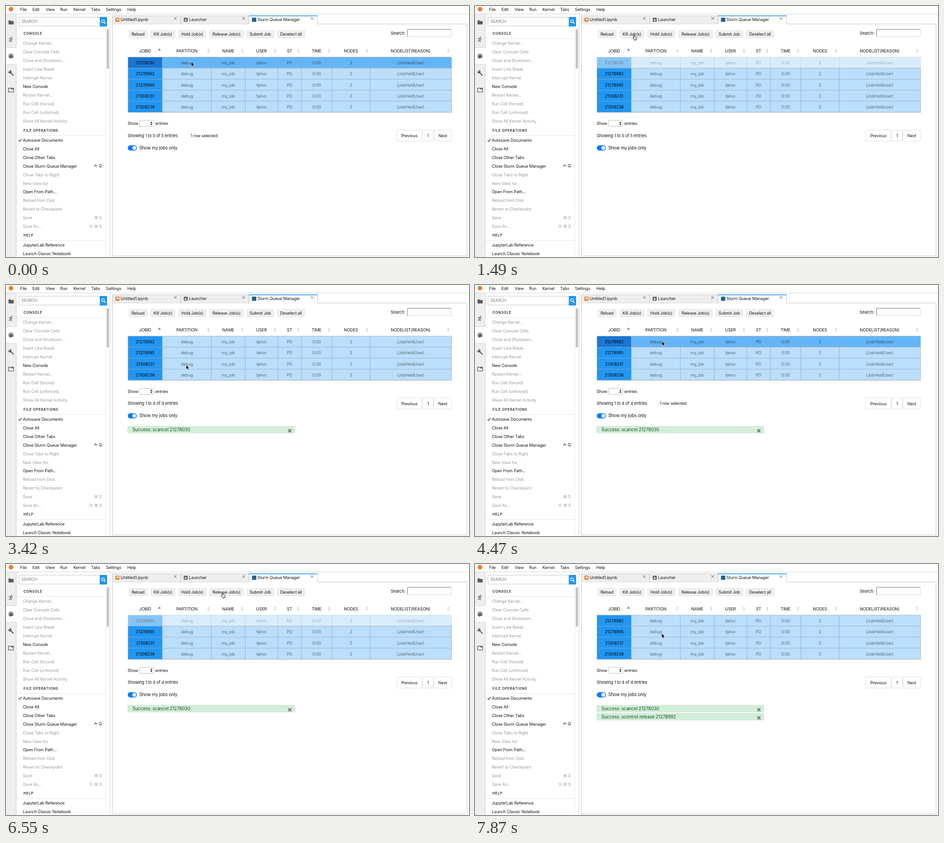
An HTML page for the animation above (8000 ms loop, 1017 by 551 pixels).

```html
<!DOCTYPE html>
<html lang="en">
<head>
<meta charset="utf-8">
<title>Queue manager</title>
<style>
html, body { margin: 0; width: 100%; height: 100%; overflow: hidden; background: #fff; }
svg { display: block; }
text { font: 9.1px Inter, "Open Sans", "DejaVu Sans", sans-serif; letter-spacing: -.02em; white-space: pre; }
</style>
</head>
<body>
<svg id="stage" width="1017" height="551" viewBox="0 0 1017 551"></svg>
<script>
const stage = document.getElementById('stage');
const LOOP = 8000, ROW = 24.2, TOP = 112.2;
const INK = '#161616', DIM = '#9c9c9c', BLUE = '#2196f3', ICON = '#5c5c5c';

function el(parent, tag, attrs = {}) {
  const node = document.createElementNS('http://www.w3.org/2000/svg', tag);
  for (const key in attrs) node.setAttribute(key, attrs[key]);
  parent.append(node);
  return node;
}
const group = (parent = stage) => el(parent, 'g');
const box = (p, x, y, w, h, fill, more) => el(p, 'rect', { x, y, width: w, height: h, fill, ...more });
const path = (p, d, stroke, width = 1, more) =>
  el(p, 'path', { d, fill: 'none', stroke, 'stroke-width': width, ...more });
const shape = (p, d, fill) => el(p, 'path', { d, fill });
const dot = (p, cx, cy, r, fill) => el(p, 'circle', { cx, cy, r, fill });

// y is the middle of the capitals
function label(p, str, x, y, fill = INK, anchor = 'start', size = 9.1, style = '') {
  const node = el(p, 'text', { x, y: y + size * .36, fill, 'text-anchor': anchor, style: `font-size:${size}px;${style}` });
  node.textContent = str;
  return node;
}
const cross = (p, x, y, r, color, width) =>
  path(p, `M${x - r} ${y - r}l${2 * r} ${2 * r}m0 ${-2 * r}l${-2 * r} ${2 * r}`, color, width);
const show = (node, on) => node.setAttribute('visibility', on ? 'visible' : 'hidden');

function drawMenu() {
  dot(stage, 11, 7, 5, '#f37726');
  [['File', 31], ['Edit', 58], ['View', 87], ['Run', 119], ['Kernel', 148], ['Tabs', 187], ['Settings', 219.5], ['Help', 266.5]]
    .forEach(([name, x]) => label(stage, name, x, 8));
}

function drawRail() {
  box(stage, 0, 17, 23, 534, '#eeeeee');
  box(stage, 0, 17, 1017, .8, '#c9c9c9');
  box(stage, 22, 17, .8, 534, '#c4c4c4');
  box(stage, 0, 91.5, 23, 36.5, '#fff');
  path(stage, 'M0 91.5H22.5M0 128H22.5', '#c9c9c9', .8);
  shape(stage, 'M5.5 32.5q0-1 1-1h3l1.4 1.4h5q1 0 1 1v5.6q0 1-1 1h-9.400q-1 0-1-1z', ICON);
  dot(stage, 12.6, 68.7, 1.2, ICON);
  path(stage, 'M7.300 73.200V71.500L10.800 70.400L12.300 72.700L15 73.500M10.800 70.600L10 74.400L12 76V79.300M10 74.500L9.200 77.600L6 77', ICON, 1.3);
  dot(stage, 11, 110, 5.4, ICON);
  box(stage, 11.5, 112, 4, 4, '#fff', { rx: 1.5 });
  dot(stage, 13.4, 111.4, 2.6, ICON);
  [[7.7, 109.3], [9.6, 106.8], [12.5, 106.8], [14.4, 109.3]].forEach(([x, y]) => dot(stage, x, y, .95, '#fff'));
  path(stage, 'M9.500 145.500L16 152', ICON, 2.4, { 'stroke-linecap': 'round' });
  dot(stage, 8.6, 144.6, 3.5, ICON);
  path(stage, 'M4.500 140.500L8.200 144.200', '#eee', 2.2);
  path(stage, 'M5.600 180.500h11v8.400h-11z', ICON, 1.3);
  box(stage, 11.3, 180, 5.6, 2.9, ICON);
}

function drawPalette() {
  box(stage, 28.5, 24.5, 178, 19.5, '#fff', { stroke: '#c2c2c2', 'stroke-width': .9 });
  label(stage, 'SEARCH', 34, 34.3, '#7c7c7c', 'start', 8.8);
  box(stage, 206, 24, 16, 21, BLUE);
  el(stage, 'circle', { cx: 213, cy: 33.4, r: 3, fill: 'none', stroke: '#fff', 'stroke-width': 1.3 });
  path(stage, 'M215.200 35.600l3.300 3.300', '#fff', 1.5);

  // a leading * marks an enabled command
  const sections = [
    ['CONSOLE', 60.5, 82, ['Change Kernel...', 'Clear Console Cells', 'Close and Shutdown...', 'Insert Line Break',
      'Interrupt Kernel', '*New Console', 'Restart Kernel...', 'Run Cell (forced)', 'Run Cell (unforced)', 'Show All Kernel Activity']],
    ['FILE OPERATIONS', 273, 294.5, ['*Autosave Documents', '*Close All', '*Close Other Tabs', '*Close Slurm Queue Manager',
      'Close Tabs to Right', 'New View for', '*Open From Path...', 'Reload from Disk', 'Revert to Checkpoint', 'Save', 'Save As...']],
    ['HELP', 503.7, 525, ['*JupyterLab Reference', '*Launch Classic Notebook']]
  ];
  for (const [title, y, first, items] of sections) {
    label(stage, title, 38.5, y, '#222', 'start', 7.4, 'font-weight:600;letter-spacing:.8px');
    box(stage, 23, y + 10.8, 196, .8, '#dedede');
    items.forEach((item, i) => {
      const on = item[0] === '*';
      label(stage, on ? item.slice(1) : item, 37, first + i * 18.95, on ? INK : DIM);
    });
  }
  path(stage, 'M27.700 294.800l2.300 2.400l4.700-5.300', INK, 1.2);
  path(stage, 'M194 352.200l3-3.400l3 3.400', INK, 1.1);
  label(stage, 'Q', 210.5, 351, INK, 'end');
  label(stage, '⌘ S', 210.5, 465, DIM, 'end');
  label(stage, '⇧ ⌘ S', 210.5, 484, DIM, 'end');
  box(stage, 218.8, 48, .8, 503, '#e2e2e2');
  box(stage, 221.3, 51, 5, 86.500, '#c1c1c1', { rx: 2.5 });
  box(stage, 228, 17, .8, 534, '#c4c4c4');
}

function drawTabs() {
  path(stage, 'M233.500 39.500H1012.700V548.700H233.500z', '#bfbfbf', .9);
  [['Untitled1.ipynb', 233.5, 251.5], ['Launcher', 383.700, 402], ['Slurm Queue Manager', 534, 552.5]].forEach(([name, x, tx], i) => {
    const live = i === 2;
    box(stage, x, 21.5, 150.2, live ? 18.6 : 18, live ? '#fff' : '#eeeeee');
    path(stage, `M${x} 39.500V21.500h150.200V39.500`, '#bfbfbf', .9);
    if (live) box(stage, x - .3, 20.7, 150.8, 1.700, BLUE);
    label(stage, name, tx, 30);
    cross(stage, x + 138.3, 27.4, 2.9, '#444', .9);
  });
  box(stage, 240.4, 25.7, 8.700, 8.7, '#ef6c00', { rx: .8 });
  shape(stage, 'M242.700 27.300h4.600v5.500l-2.300-2l-2.300 2z', '#fff');
  box(stage, 390.4, 25.7, 8.7, 8.7, '#616161', { rx: .8 });
  shape(stage, 'M394.700 27.500l2.600 5h-5.200z', '#eee');
  box(stage, 540.3, 25.5, 9.5, 9.300, '#1b638f');
}

const COLS = [268, 343.3, 451, 525.5, 597, 648.7, 716, 800, 978.7];
const MID = [305.6, 397.3, 488.2, 561, 622.8, 682.2, 757.8, 888.7];

function drawToolbar() {
  [['Reload', 270, 310], ['Kill Job(s)', 318, 371], ['Hold Job(s)', 379, 439.5], ['Release Job(s)', 447, 521.700],
    ['Submit Job', 529, 588], ['Deselect all', 596, 656]].forEach(([name, a, b]) => {
    box(stage, a + .2, 53.4, b - a, 16.6, '#efefef', { rx: 1.7, stroke: '#dcdcdc', 'stroke-width': .7 });
    label(stage, name, (a + b) / 2, 62, INK, 'middle');
  });
  label(stage, 'Search:', 845, 60, INK, 'start', 9.2);
  box(stage, 882, 51.2, 96, 16.3, '#fff', { stroke: '#cfcfcf', 'stroke-width': .9 });
  path(stage, 'M882 67.500V51.200H978', '#7d7d7d', 1);

  ['JOBID', 'PARTITION', 'NAME', 'USER', 'ST', 'TIME', 'NODES', 'NODELIST(REASON)']
    .forEach((name, i) => label(stage, name, MID[i], 98.7, INK, 'middle', 9.2));
  shape(stage, 'M333.800 97.900l3.200-4.800l3.200 4.800z', '#7f76dc');
  for (const x of [444.500, 519, 590.7, 642, 709.7, 792.8, 971.3])
    shape(stage, `M${x - 2.7} 97.700l2.700-4l2.700 4zM${x - 2.7} 99.300l2.700 4l2.700-4z`, '#d2d2d2');
}

function makeRow(parent, id, i) {
  const g = group(parent), y = TOP + i * ROW;
  const first = box(g, COLS[0], y, COLS[1] - COLS[0], ROW, BLUE);
  const rest = box(g, COLS[1], y, COLS[8] - COLS[1], ROW, '#bbdefb');
  path(g, `M${COLS[0]} ${y}H${COLS[8]}` + COLS.map(x => `M${x} ${y}v${ROW}`).join(''), '#8ea5b8', .75);
  [id, 'debug', 'my_job', 'tjelvo', 'PD', '0:00', '2', '(JobHeldUser)'].forEach((str, c) =>
    label(g, str, MID[c], y + 12.7, c ? 'rgba(0,0,0,.5)' : '#0b0b0b', 'middle'));
  return {
    g,
    set(picked, faded) {
      first.setAttribute('fill', picked ? '#1976d2' : BLUE);
      rest.setAttribute('fill', picked ? '#64b5f6' : '#bbdefb');
      g.setAttribute('opacity', faded ? .55 : 1);
    }
  };
}

function makeAlert(parent, str, y) {
  const g = group(parent);
  box(g, 267.3, y, 367.4, 15, '#d4edda', { rx: 2, stroke: '#c3e6cb', 'stroke-width': .8 });
  label(g, str, 277.7, y + 7.6, '#155724', 'start', 10);
  cross(g, 623.5, y + 10, 3.3, '#66736a', 2.1);
  return g;
}

drawMenu();
drawRail();
drawPalette();
drawTabs();
drawToolbar();

const body = group();
const rows = ['21278030', '21278992', '21278995', '21308231', '21308236'].map((id, i) => makeRow(body, id, i));
box(body, 267.6, TOP + 5 * ROW - .3, 711.5, 1, '#a3a9ae');
label(body, 'Show', 267.3, 257.5);
box(body, 293.3, 251, 31.700, 13.3, '#fff', { rx: 2.5, stroke: '#a6a6a6', 'stroke-width': .8 });
shape(body, 'M317 256.700l2.300-3.200l2.300 3.200zM317 258.500l2.300 3.200l2.300-3.200z', '#222');
label(body, 'entries', 328, 257.5);
const info = label(body, '', 267.3, 284.3, INK, 'start', 9.2);
const picked = label(body, '1 row selected', 405.7, 284.3);
[['Previous', 858, 914], ['1', 915, 939], ['Next', 940, 979]].forEach(([name, a, b]) => {
  box(body, a + .2, 272.3, b - a - .4, 24, '#fff', { rx: 1.5, stroke: '#d6d6d6', 'stroke-width': .8 });
  label(body, name, (a + b) / 2, 284.7, INK, 'middle');
});
box(body, 267.5, 305.8, 20, 11.4, '#007bff', { rx: 5.7 });
dot(body, 281.7, 311.5, 4.2, '#fff');
label(body, 'Show my jobs only', 292.7, 311, INK, 'start', 9.8);
const killed = makeAlert(body, 'Success: scancel 21278030', 334.2);
const released = makeAlert(body, 'Success: scontrol release 21278992', 352);

const arrow = group();
path(arrow, 'M0 0V10L2.300 8L3.900 11.500L5.700 10.700L4.200 7.300H7.200z', '#fff', .8, { fill: '#000', 'stroke-linejoin': 'round' });
const hand = group();
path(hand, 'M-1 7V1.200Q-1 0 0 0T1 1.200V4.500Q2 3.700 2.800 4.700Q3.800 4.200 4.400 5.200Q5.700 4.900 5.700 6.300V8.500Q5.700 10 4.700 11.600H-.2Q-.8 9.800-2.600 7.800Q-3.200 6.700-2.300 6.300Q-1.700 6.200-1 7z',
  '#000', .9, { fill: '#fff', 'stroke-linejoin': 'round' });
path(hand, 'M1.200 8V10.200M2.700 8V10.200M4.100 8V10.200', '#000', .5);

// time, x, y, hand
const MOVES = [
  [0, 407, 122.5], [150, 405, 125], [300, 397, 112], [450, 380, 92], [600, 364, 76], [750, 354, 66, 1], [890, 349.7, 63.3, 1],
  [2240, 335, 88], [2380, 310.7, 135], [2530, 314, 160], [2680, 326, 188], [2830, 342, 210], [2980, 360, 226],
  [3130, 376, 235], [3280, 389, 237], [3420, 395.7, 175.3], [3570, 403, 150], [3720, 408, 135], [3870, 410, 126],
  [4020, 410.700, 123.3], [4770, 410.2, 122.7], [5070, 412, 122], [5210, 413.5, 120], [5360, 411, 122],
  [5660, 422, 110], [5800, 452, 78], [5950, 475.7, 63, 1], [6690, 475, 56, 1], [6840, 470, 51], [6990, 456, 70],
  [7130, 440, 100], [7280, 422, 130], [7430, 409.7, 147.5], [7570, 410, 152.2]
];
const within = (t, a, b) => t >= a && t < b;

function draw(t) {
  const gone = t >= 2830;
  body.setAttribute('transform', `translate(0 ${gone ? -ROW : 0})`);
  show(rows[0].g, !gone);
  rows[0].set(t < 1490, within(t, 1490, 2240));
  rows[1].set(within(t, 4470, 6400), within(t, 6400, 7870));
  const n = gone ? 4 : 5;
  info.textContent = `Showing 1 to ${n} of ${n} entries`;
  show(picked, t < 1490 || within(t, 4470, 6400));
  show(killed, t >= 2240);
  show(released, t >= 7870);

  const [, x, y, isHand] = MOVES.findLast(m => m[0] <= t);
  show(arrow, !isHand);
  show(hand, isHand);
  (isHand ? hand : arrow).setAttribute('transform', `translate(${x} ${y})`);
}

const start = performance.now();
function tick() {
  draw((performance.now() - start) % LOOP);
  requestAnimationFrame(tick);
}
tick();
</script>
</body>
</html>
```
